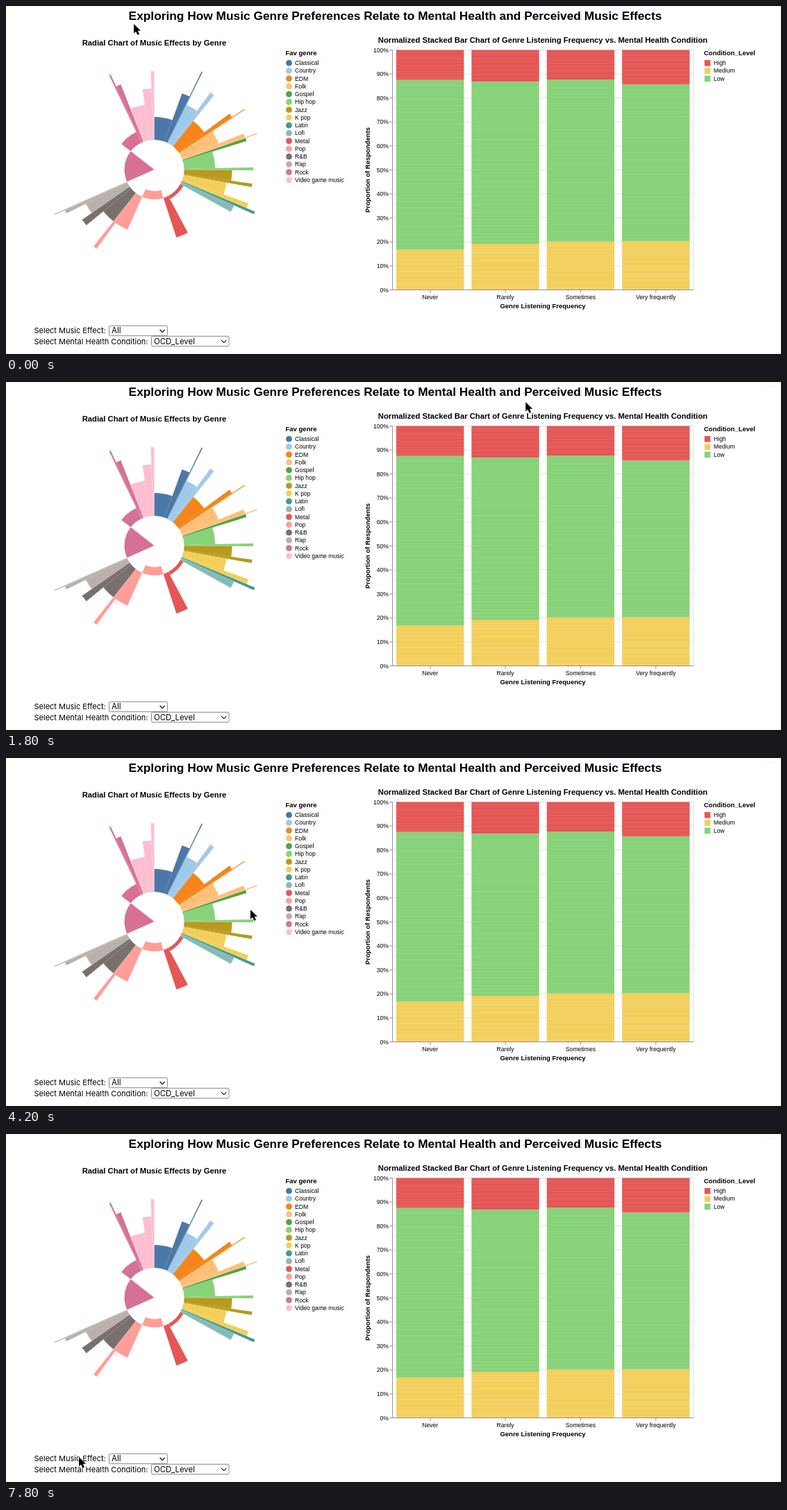
Animation of 1116x502 px, one loop 8 s. Source, as an HTML page:

```html
<!DOCTYPE html>
<html lang="en">
<head>
<meta charset="utf-8">
<title>Music genre dashboard</title>
<style>
  html, body { margin: 0; width: 100%; height: 100%; overflow: hidden; background: #fff; }
  svg { display: block; width: 1116px; height: 502px; }
  text { font: 8.65px "Liberation Sans", Arial, sans-serif; fill: #000; }
  .title { font-size: 17.32px; font-weight: bold; }
  .head { font-size: 11.25px; font-weight: bold; }
  .sub { font-size: 9.52px; font-weight: bold; }
  .form { font: 11px Inter, Roboto, sans-serif; }
  .value { font-size: 11.4px; }
</style>
</head>
<body>
<svg id="stage" viewBox="0 0 1116 502"></svg>
<script>
const stage = document.getElementById('stage');

function add(tag, attrs, content) {
  const el = document.createElementNS('http://www.w3.org/2000/svg', tag);
  for (const key in attrs) el.setAttribute(key, attrs[key]);
  if (content !== undefined) el.textContent = content;
  stage.appendChild(el);
  return el;
}
const rect = (x, y, width, height, fill, more) => add('rect', { x, y, width, height, fill, ...more });
const line = (x1, y1, x2, y2, stroke, more) => add('line', { x1, y1, x2, y2, stroke, ...more });
const label = (x, y, text, cls = '', anchor = 'start', more) =>
  add('text', { x, y, class: cls, 'text-anchor': anchor, ...more }, text);

// Each slice is [end angle, outer radius, inner radius]; slices follow on clockwise.
const RING = 43;
const genres = [
  ['Classical', '#4c78a8', [[20, 76], [25.7, 117], [26.3, 157]]],
  ['Country', '#9ecae9', [[36, 104.5], [38.7, 137.5]]],
  ['EDM', '#f58518', [[53.3, 90], [56, 135], [56.5, 157]]],
  ['Folk', '#ffbf79', [[68, 100], [70.4, 138.5], [70.9, 157]]],
  ['Gospel', '#54a24b', [[72.8, 139.3]]],
  ['Hip hop', '#88d27a', [[88.7, 87.7], [90.4, 142.5]]],
  ['Jazz', '#b79a20', [[98.2, 112], [100.2, 142.5]]],
  ['K pop', '#f2cf5b', [[109.7, 106], [112.7, 144]]],
  ['Latin', '#439894', [[114.2, 157]]],
  ['Lofi', '#83bcb6', [[119, 126]]],
  ['Metal', '#e45756', [[152, 48], [162, 103]]],
  ['Pop', '#ff9d98', [[204, RING, 31], [216, 95], [218.3, 141]]],
  ['R&B', '#79706e', [[230.6, 95], [235.2, 126.5]]],
  ['Rap', '#bab0ac', [[243.4, 110], [245.5, 141.5], [246, 157]]],
  ['Rock', '#d67195', [[308, RING, 0], [334.5, 60], [335.4, 151], [338.6, 132]]],
  ['Video game music', '#fcbfd2', [[351.7, 94.5], [358, 117], [360, 142]]]
];

function slicePath(a0, a1, r0, r1) {
  const at = (a, r) => {
    const rad = a * Math.PI / 180;
    return `${(213.5 + r * Math.sin(rad)).toFixed(2)} ${(236 - r * Math.cos(rad)).toFixed(2)}`;
  };
  return `M${at(a0, r0)}L${at(a0, r1)}A${r1} ${r1} 0 0 1 ${at(a1, r1)}` +
    `L${at(a1, r0)}A${r0} ${r0} 0 0 0 ${at(a0, r0)}Z`;
}

function drawRadial() {
  label(213.5, 57, 'Radial Chart of Music Effects by Genre', 'head', 'middle');
  label(402.5, 71.3, 'Fav genre', 'sub');
  let from = 0;
  genres.forEach(([name, fill, slices], i) => {
    for (const [to, outer, inner = RING] of slices) {
      add('path', { d: slicePath(from, to, inner, outer), fill });
      from = to;
    }
    const y = 82.2 + 11.25 * i;
    add('circle', { cx: 407.5, cy: y, r: 4.4, fill });
    label(416, y + 3, name);
  });
}

const RED = '#e45756', YELLOW = '#f2cf5b', GREEN = '#88d27a';
const plot = { x: 556.5, y: 63.5, w: 433.5, h: 346 };

let seed = 7;
const random = () => (seed = seed * 16807 % 2147483647) / 2147483647;

// Faint seams where the stacked rows of data meet.
function seams(x, y, w, h, gap, opacity) {
  for (let s = y + gap; s < y + h - 1; s += gap * (0.4 + 1.2 * random()))
    rect(x, s, w, 0.6, '#fff', { opacity: opacity * (0.4 + 0.6 * random()) });
}

function drawBars() {
  const { x, y, w, h } = plot, bottom = y + h;
  label(773, 52.5, 'Normalized Stacked Bar Chart of Genre Listening Frequency vs. Mental Health Condition', 'head', 'middle');
  rect(x, y, w, h, 'none', { stroke: '#ddd' });
  for (let i = 0; i <= 10; i++) {
    const gy = bottom - h * i / 10;
    line(x, gy, x + w, gy, '#ddd', { 'stroke-width': 0.87 });
    line(x - 4.5, gy, x, gy, '#888', { 'stroke-width': 0.87 });
    label(551, gy + 3, i * 10 + '%', '', 'end');
  }
  const bars = [
    ['Never', 106.8, 351.6], ['Rarely', 109.2, 343],
    ['Sometimes', 106, 339.8], ['Very frequently', 113.4, 339.6]
  ];
  bars.forEach(([name, high, low], i) => {
    const mid = x + w * (i + 0.5) / 4, left = mid - 48.7, bw = 97.4;
    rect(left, y, bw, high - y, RED);
    rect(left, high, bw, low - high, GREEN);
    rect(left, low, bw, bottom - low, YELLOW);
    seams(left, y, bw, high - y, 4, 0.2);
    seams(left, high, bw, low - high, 8, 0.17);
    seams(left, low, bw, bottom - low, 4, 0.3);
    line(mid, bottom, mid, bottom + 4.5, '#888', { 'stroke-width': 0.87 });
    label(mid, 423, name, '', 'middle');
  });
  line(x, y, x, bottom, '#888', { 'stroke-width': 0.87 });
  line(x, bottom, x + w, bottom, '#888', { 'stroke-width': 0.87 });
  label(773, 436, 'Genre Listening Frequency', 'sub', 'middle');
  label(0, 0, 'Proportion of Respondents', 'sub', 'middle', { transform: 'translate(523.5 236.5) rotate(-90)' });

  label(1005, 71.3, 'Condition_Level', 'sub');
  [['High', RED], ['Medium', YELLOW], ['Low', GREEN]].forEach(([name, fill], i) => {
    const cy = 82.2 + 11.25 * i;
    rect(1005.8, cy - 4.2, 8.6, 8.6, fill);
    label(1019, cy + 3, name);
  });
}

function drawSelect(y, text, x, width, value) {
  label(40.5, y + 11.2, text, 'form');
  rect(x, y, width, 14.5, '#fff', { rx: 2, stroke: '#767676', 'stroke-width': 0.9 });
  label(x + 3.6, y + 11.2, value, 'form value');
  add('path', {
    d: `M${x + width - 11} ${y + 5.6}l3.7 3.7l3.7 -3.7`,
    fill: 'none', stroke: '#222', 'stroke-width': 1.3
  });
}

rect(0, 0, 1116, 502, '#fff');
const edge = rect(0.5, 0.5, 1115, 501, 'none');
const corner = add('circle', { cx: 1102.5, cy: -3, r: 10, fill: 'none', stroke: '#f1eeee' });
label(560.5, 19.5, 'Exploring How Music Genre Preferences Relate to Mental Health and Perceived Music Effects', 'title', 'middle');
drawRadial();
drawBars();
drawSelect(461.2, 'Select Music Effect:', 148.5, 84, 'All');
drawSelect(476.3, 'Select Mental Health Condition:', 209.5, 111.5, 'OCD_Level');
const cursor = add('path', {
  d: 'M0 0V13.6L3.1 10.8L5.3 15.8L7.9 14.7L5.8 9.8H10Z',
  fill: '#000', stroke: '#fff', 'stroke-width': 1.1, 'paint-order': 'stroke'
});

// Pointer stops: [time, x, y]
const stops = [
  [0, 184, 26], [1200, 501, 36], [2400, 924, 22], [2800, 938, 24], [3000, 938, 24],
  [4200, 352, 219], [5400, 771, 348], [6800, 631, 287], [7800, 105, 466]
];

// Slope at a stop, flat wherever the pointer turns back.
function slope(i, axis) {
  const a = stops[i - 1], b = stops[i], c = stops[i + 1];
  if (!a || !c) return 0;
  const before = (b[axis] - a[axis]) / (b[0] - a[0]);
  const after = (c[axis] - b[axis]) / (c[0] - b[0]);
  return before * after <= 0 ? 0 : 2 * before * after / (before + after);
}

function pointer(t, axis) {
  const last = stops.length - 1;
  if (t >= stops[last][0]) return stops[last][axis];
  const i = stops.findIndex(s => s[0] > t) - 1;
  const a = stops[i], b = stops[i + 1], span = b[0] - a[0], u = (t - a[0]) / span;
  const ease = u * u * (3 - 2 * u);
  return a[axis] + (b[axis] - a[axis]) * ease +
    span * u * (1 - u) * ((1 - u) * slope(i, axis) - u * slope(i + 1, axis));
}

const LOOP = 8000, STEP = 200;

function render(time) {
  const t = Math.floor(time % LOOP / STEP) * STEP;
  cursor.setAttribute('transform', `translate(${pointer(t, 1)} ${pointer(t, 2)})`);
  edge.setAttribute('stroke', t < STEP ? '#f2f2f2' : '#fcefea');
  corner.setAttribute('opacity', t < STEP ? 0 : 1);
}

const start = performance.now();
function tick() {
  render(performance.now() - start);
  requestAnimationFrame(tick);
}
tick();
</script>
</body>
</html>
```
